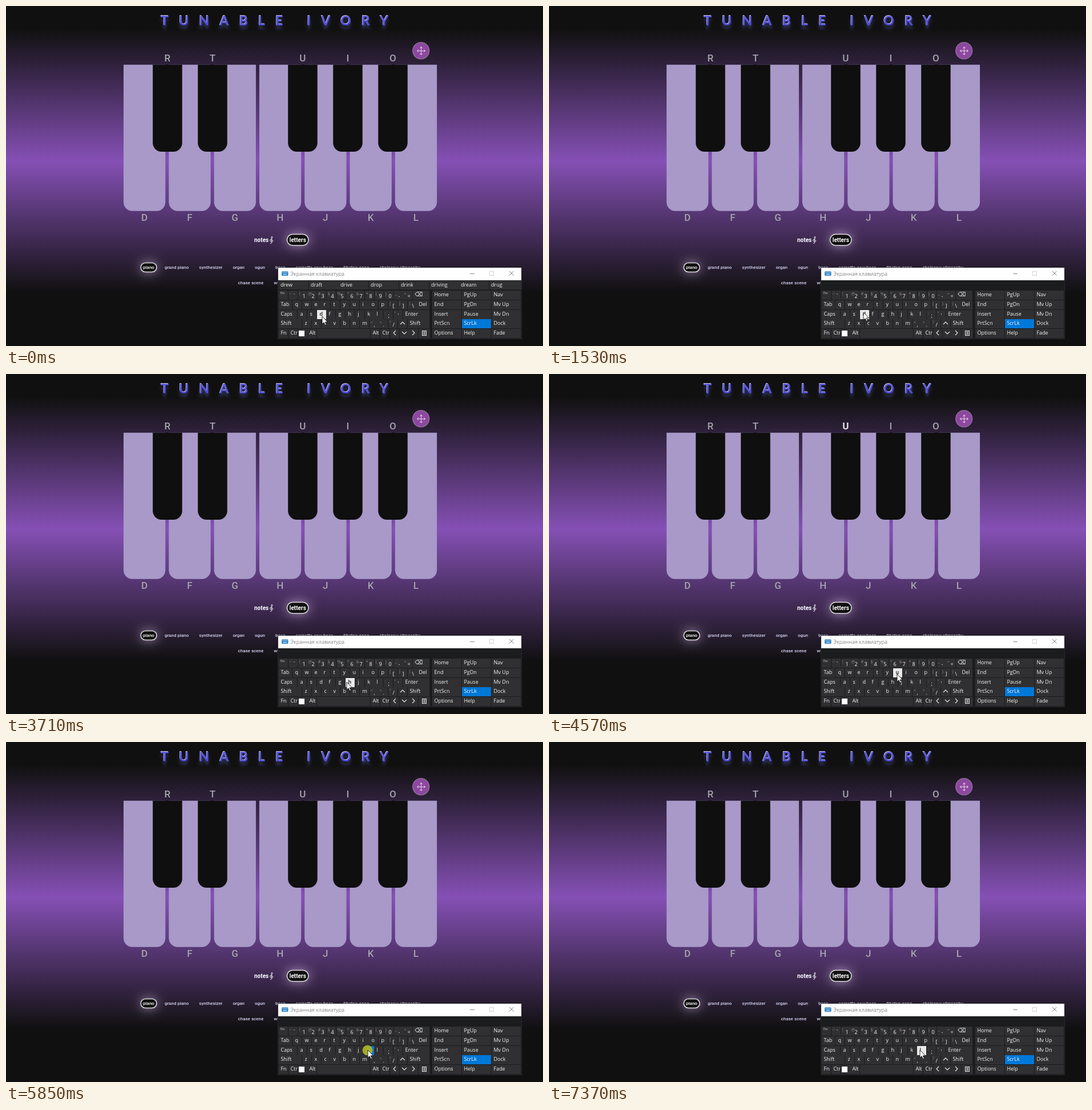
Animation of 941x595 px, one loop 7460 ms. Source, as an HTML page with a canvas:

```html
<!DOCTYPE html>
<html lang="en">
<head>
<meta charset="utf-8">
<title>Tunable Ivory</title>
<style>
html, body { margin: 0; width: 100%; height: 100%; overflow: hidden; background: #101010; }
canvas { display: block; }
</style>
</head>
<body>
<canvas id="stage" width="941" height="595"></canvas>
<script>
const c = document.getElementById('stage').getContext('2d');
const LOOP = 7460, HOLD = 70;
const PAGE = 'Roboto, Arial, sans-serif';
const UI = '"Open Sans", "Noto Sans", "DejaVu Sans", sans-serif';

// Time of each key press; the cursor's path follows from it
const clicks = { d: 1390, r: 1850, f: 2230, t: 2850, g: 3310, h: 3870,
                 u: 4430, j: 4890, i: 5450, k: 5850, o: 6360, l: 6840 };

// On-screen keys: label¦width, default width 16.8
const rows = [
  'Esc ~` !1 @2 #3 $4 %5 ^6 &7 *8 (9 )0 _- += ⌫¦30',
  'Tab¦24 q w e r t y u i o p {[ }] |\\ Del¦23.4',
  'Caps¦33 a s d f g h j k l :; "\' Enter¦47.2',
  'Shift¦41 z x c v b n m <, >. ?/ up Shift¦38.8',
  'Fn Ctr win Alt space¦94 Alt Ctr left down right menu¦21'
];
const side = ['Home PgUp Nav', 'End PgDn Mv_Up', 'Insert Pause Mv_Dn', 'PrtScn ScrLk Dock', 'Options Help Fade'];
const keys = [];
function addRow(row, r, x, width) {
  for (const item of row.split(' ')) {
    const [label, w = width] = item.split('¦');
    keys.push({ label: label.replace(/_(?=\w)/, ' '), x: Math.round(x), y: Math.round(498 + r * 16.8), w: Math.round(w - 1) });
    x += +w;
  }
}
rows.forEach((row, r) => addRow(row, r, 478, 16.8));
side.forEach((row, r) => addRow(row, r, 747, 52));

function text(s, x, y, font, fill, align = 'left') {
  c.font = font;
  c.fillStyle = fill;
  c.textAlign = align;
  c.fillText(s, x, y);
}
function box(x, y, w, h, fill, radius = 0) {
  c.beginPath();
  c.roundRect(x, y, w, h, radius);
  c.fillStyle = fill;
  c.fill();
}
function line(points, color, width = 1) {
  c.beginPath();
  points.forEach(([x, y]) => c.lineTo(x, y));
  c.strokeStyle = color;
  c.lineWidth = width;
  c.stroke();
}
function ramp(y0, y1, ...stops) {
  const g = c.createLinearGradient(0, y0, 0, y1);
  stops.forEach((s, i) => g.addColorStop(i / (stops.length - 1), s));
  return g;
}
function pill(x, y, w, h) {
  c.save();
  c.shadowColor = 'rgba(240,215,255,.65)';
  c.shadowBlur = 20;
  box(x, y, w, h, '#101010', h / 2);
  c.restore();
  c.strokeStyle = '#dcd8e0';
  c.lineWidth = 1.6;
  c.stroke();
}

function drawTitle() {
  const s = 'TUNABLE IVORY', font = 'bold 23px Lato, sans-serif';
  c.save();
  c.font = font;
  c.letterSpacing = '0px';
  c.letterSpacing = (399 - c.measureText(s).width) / (s.length - 1) + 'px';
  c.shadowColor = 'rgba(75,75,150,.65)';
  c.shadowBlur = 5;
  c.shadowOffsetY = 6;
  text(s, 271, 34, font, '#3634a8');
  c.shadowColor = 'transparent';
  text(s, 270.5, 33, font, '#c8c8f4');
  text(s, 271.2, 34, font, ramp(18, 35, '#5d5bdc', '#4846cf'));
  c.restore();
}

function drawPiano(t) {
  const since = ch => t - clicks[ch.toLowerCase()] - HOLD;
  const lit = (ch, time = HOLD) => since(ch) >= 0 && since(ch) < time;
  const label = (ch, x, y, hot) =>
    text(ch, x, y, (hot ? 'bold' : '500') + ' 17px ' + PAGE, hot ? '#e2dce5' : '#a5a3ad', 'center');
  const key = (x, w, h, fill) => box(x, 102.8, w, h, fill, [0, 0, 15.5, 15.5]);
  [...'DFGHJKL'].forEach((ch, i) => {
    const x = 206 + i * 79.3;
    key(x, 73.3, 256, '#a899c8');
    if (lit(ch)) key(x, 73.3, 256, ramp(103, 359, 'rgba(255,255,255,0)', 'rgba(255,255,255,.45)'));
    label(ch, x + 36.5, 376, lit(ch));
  });
  [...'RT UIO'].forEach((ch, i) => {
    if (ch === ' ') return;
    const x = 257.2 + i * 79;
    key(x, 51.5, 152.2, lit(ch) ? ramp(103, 255, '#0f0f0f', '#4b3263') : '#0f0f0f');
    label(ch, x + 25.7, 97, lit(ch, 160));
  });
}

function drawLinks(words, x, y) {
  for (const w of words) {
    text(w, x, y, '500 8px ' + PAGE, w === 'piano' ? '#fff' : '#d5d3f0');
    x += c.measureText(w).width + 18;
  }
}

function drawPage(t) {
  box(0, 0, 941, 595, '#101010');
  box(0, 40, 941, 462, ramp(40, 502, '#101010', '#8550b5', '#101010'));
  drawTitle();
  drawPiano(t);

  box(712.7, 63.7, 29, 29, '#8e47a0', 15);
  c.strokeStyle = '#8d7498';
  c.lineWidth = 1.3;
  c.stroke();
  for (let i = 0; i < 4; i++) {
    c.save();
    c.translate(727.5, 78.5);
    c.rotate(i * Math.PI / 2);
    line([[0, 0], [0, -7]], '#ded3e4');
    line([[-2.3, -4.6], [0, -7], [2.3, -4.6]], '#ded3e4');
    c.restore();
  }

  text('notes', 435, 413, 'bold 10px ' + PAGE, '#fff');
  c.beginPath();
  c.moveTo(463, 415);
  c.bezierCurveTo(466, 417, 466, 414, 465, 404);
  c.bezierCurveTo(467, 402, 469, 406, 463, 409);
  c.bezierCurveTo(461, 413, 468, 414, 467.5, 411);
  c.bezierCurveTo(467, 408, 464, 409, 465, 411);
  c.strokeStyle = '#fff';
  c.lineWidth = .9;
  c.stroke();
  pill(492.5, 399.5, 37.5, 19.5);
  text('letters', 511.3, 413, 'bold 10px ' + PAGE, '#fff', 'center');

  pill(236.2, 449.5, 27.8, 16);
  drawLinks(['piano', 'grand piano', 'synthesizer', 'organ', 'ogun', 'boss',
             'cornetto cow bass', 'tibetan gong', 'chainsaw atmosphy'], 240, 460);
  drawLinks(['chase scene', 'wind'], 406.5, 487);
}

const icons = {
  up: [[-4, 2], [0, -2], [4, 2]], down: [[-4, -2], [0, 2], [4, -2]],
  left: [[2, -4], [-2, 0], [2, 4]], right: [[-2, -4], [2, 0], [-2, 4]]
};
const pressed = (label, t) => t >= clicks[label] && t < clicks[label] + HOLD;

function drawKey({ label, x, y, w }, t, tip) {
  const hover = tip.x >= x && tip.x <= x + w && tip.y >= y && tip.y < y + 17;
  const blue = label === 'ScrLk' || pressed(label, t);
  const hot = hover && !blue;
  const ink = hot ? '#151515' : '#f4f4f4';
  box(x, y, w, 16, blue ? '#0078d7' : hot ? '#e9e9e9' : '#303032');
  if (icons[label]) {
    line(icons[label].map(([a, b]) => [x + 8 + a, y + 7 + b]), '#eee', 1.1);
  } else if (label === 'win') {
    box(x + 1, y + 3, 10, 10, '#fff');
  } else if (label === 'menu') {
    c.strokeStyle = '#eee';
    c.lineWidth = 1;
    c.strokeRect(x + 6.5, y + 3.5, 7, 8);
    for (const d of [5.5, 7.5, 9.5]) line([[x + 8, y + d], [x + 12, y + d]], '#eee');
  } else if (label === 'Esc') {
    text(label, x + 3, y + 6, '5px ' + UI, '#ddd');
  } else if (label === '⌫') {
    text(label, x + 3, y + 10, '10px "DejaVu Sans", sans-serif', ink);
  } else if (/^[^a-z]{2}$/i.test(label)) {
    text(label[0], x + 1.5, y + 8, '7.5px ' + UI, '#858585');
    text(label[1], x + 7.5, y + 13, '9px ' + UI, ink);
  } else if (label !== 'space') {
    text(label, x + (label.length > 1 ? 3.4 : 4.4), y + 10, (hot ? '600' : '400') + ' 9px ' + UI, ink);
  }
}

function drawWindow(t, tip) {
  box(476, 457, 428, 126, '#2a2a2c');
  box(477, 480, 426, 102, '#1b1c1d');
  box(477, 458, 426, 22, '#fff');
  box(483, 464.5, 11.5, 7.5, '#2f83c5', 1);
  for (let i = 0; i < 4; i++) box(484.5 + i * 2.3, 466, 1.3, 1.3, '#d5ecfb');
  box(485.5, 469, 6.5, 1.2, '#d5ecfb');
  text('Экранная клавиатура', 498.5, 472, '9px ' + UI, '#858585');
  line([[813, 468.5], [821, 468.5]], '#888');
  c.strokeStyle = '#d4d4d4';
  c.strokeRect(847.5, 464.5, 7, 7);
  line([[882, 464], [889.5, 471.5]], '#777');
  line([[889.5, 464], [882, 471.5]], '#777');
  if (t < clicks.d + HOLD) {
    'drew draft drive drop drink driving dream drug'.split(' ').forEach((w, i) => {
      const x = Math.round(478 + i * 52.7);
      box(x, 481, i < 7 ? 52 : 56, 15, '#303032');
      text(w, x + 3, 491, '9px ' + UI, '#f4f4f4');
    });
  }
  keys.forEach(k => drawKey(k, t, tip));
}

// Rest at each key around its click, glide evenly to the next one between
const stops = [{ x: 554, y: 543, leave: 440 }];
for (const ch in clicks) {
  const k = keys.find(k => k.label === ch);
  stops.push({ x: k.x + 5, y: k.y + 7, arrive: clicks[ch] - 80, leave: clicks[ch] + 80 });
}
stops[1].arrive = 670;

function cursorAt(t) {
  const i = stops.findLastIndex(s => t >= s.leave);
  const a = stops[Math.max(i, 0)], b = stops[i + 1] || a;
  const f = a === b ? 0 : Math.min(1, (t - a.leave) / (b.arrive - a.leave));
  return { x: Math.round(a.x + (b.x - a.x) * f), y: Math.round(a.y + (b.y - a.y) * f) };
}

function drawCursor(t, { x, y }) {
  if (Object.keys(clicks).some(ch => pressed(ch, t))) {
    box(x - 9.5, y - 8.5, 18, 18, 'rgba(190,185,20,.85)', 9);
  }
  c.beginPath();
  [[0, 0], [0, 13.5], [3.1, 10.8], [5.2, 15.5], [7.3, 14.5], [5.2, 10], [9.4, 10]]
    .forEach(([a, b]) => c.lineTo(x + a, y + b));
  c.closePath();
  c.fillStyle = '#fff';
  c.fill();
  c.strokeStyle = '#111';
  c.lineWidth = .9;
  c.stroke();
}

const start = performance.now();
function frame(now) {
  const t = Math.max(0, now - start) % LOOP;
  const tip = cursorAt(t);
  drawPage(t);
  drawWindow(t, tip);
  drawCursor(t, tip);
  requestAnimationFrame(frame);
}
requestAnimationFrame(frame);
</script>
</body>
</html>
```
